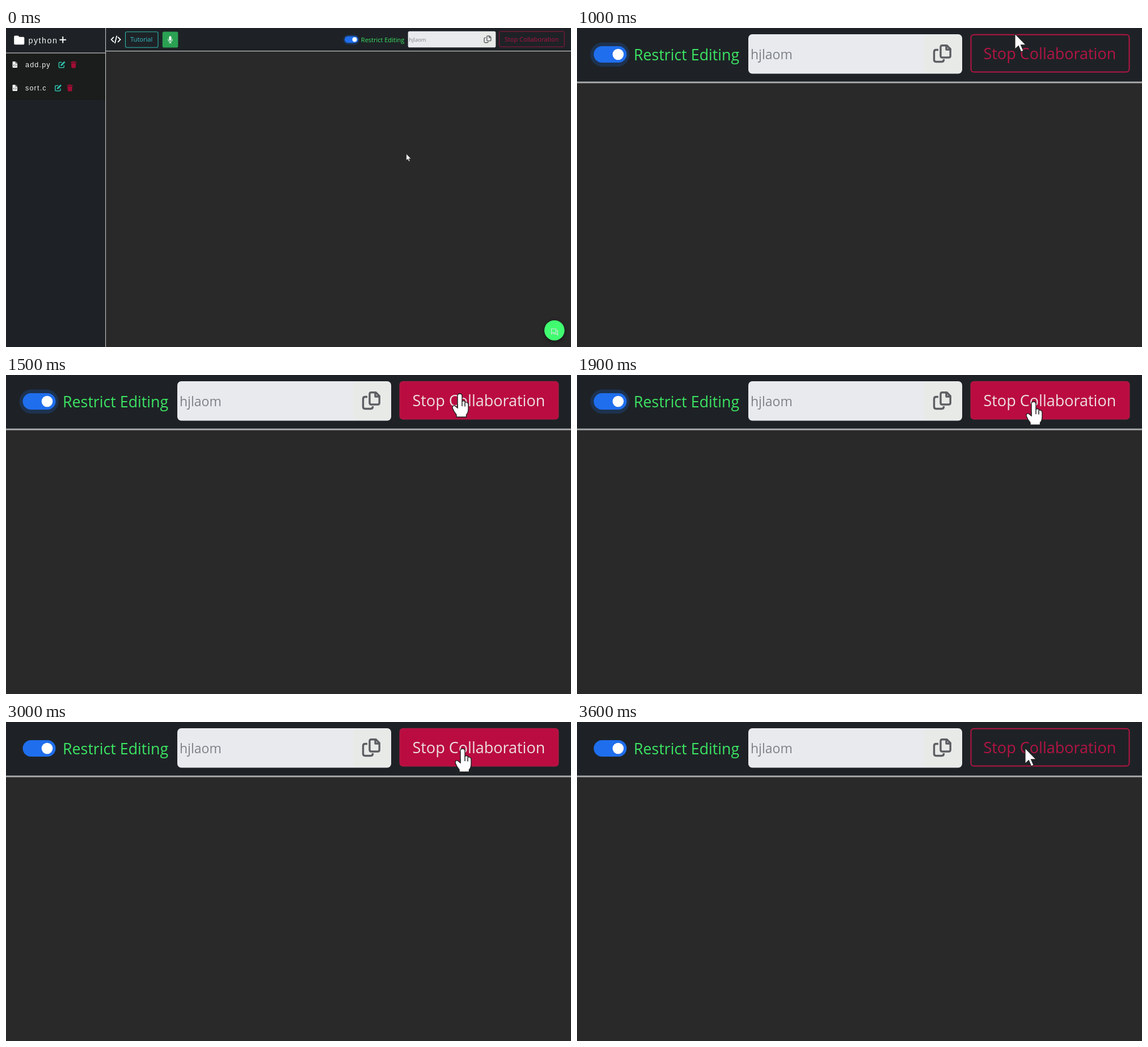
An HTML page with a canvas for the animation above (3750 ms loop, 996 by 562 pixels).

```html
<!DOCTYPE html>
<html lang="en">
<head>
<meta charset="utf-8">
<title>Editor toolbar</title>
<style>
  html, body { margin: 0; width: 100%; height: 100%; overflow: hidden; background: #292929; }
  canvas { display: block; }
</style>
</head>
<body>
<canvas id="stage" width="996" height="562"></canvas>
<script>
const ctx = document.getElementById('stage').getContext('2d');
const LOOP = 3750, STEP = 50;
const ZOOM = 2.438, PIVOT = { x: 991.5, y: 2.2 };
const UI = '"Open Sans", "Noto Sans", sans-serif';
const SANS = '"Liberation Sans", Arial, sans-serif';
const NAV = '#1e2226', LINE = '#c3c5c7', TEAL = '#2fc0ae', RED = '#b31444';

// Pointer path in close-up coordinates: time, x, y
const POINTER = [
  [0, 295, 538], [350, 292, 481], [400, 292, 481], [450, 325, 386],
  [500, 490, 180], [550, 685, 30], [600, 735, 12], [1000, 772, 10],
  [1100, 775, 9], [1150, 779, 12], [1500, 800, 33], [1650, 801, 35],
  [1900, 805, 47], [3050, 805, 47], [3500, 790, 46]
];

const clamp = v => Math.max(0, Math.min(1, v));
const smooth = v => { v = clamp(v); return v * v * (3 - 2 * v); };
const mix = (a, b, k) => a + (b - a) * k;
const mixRgb = (a, b, k) => `rgb(${a.map((v, i) => Math.round(mix(v, b[i], k))).join(',')})`;

function pointerAt(t) {
  const i = POINTER.findIndex(p => p[0] > t);
  if (i < 0) return POINTER[POINTER.length - 1].slice(1);
  const a = POINTER[i - 1], b = POINTER[i], k = (t - a[0]) / (b[0] - a[0]);
  return [mix(a[1], b[1], k), mix(a[2], b[2], k)];
}

function box(x, y, w, h, fill) {
  ctx.fillStyle = fill;
  ctx.fillRect(x, y, w, h);
}

function round(x, y, w, h, r, fill, stroke, width) {
  ctx.beginPath();
  ctx.roundRect(x, y, w, h, r);
  paint(null, fill, stroke, width);
}

function disc(x, y, r, fill) {
  ctx.beginPath();
  ctx.arc(x, y, r, 0, Math.PI * 2);
  ctx.fillStyle = fill;
  ctx.fill();
}

function paint(path, fill, stroke, width = 1) {
  const args = path ? [new Path2D(path)] : [];
  if (fill) { ctx.fillStyle = fill; ctx.fill(...args); }
  if (stroke) { ctx.strokeStyle = stroke; ctx.lineWidth = width; ctx.stroke(...args); }
}

function text(str, x, y, size, family, fill, spacing = 0) {
  ctx.font = `${size}px ${family}`;
  ctx.letterSpacing = spacing + 'px';
  ctx.fillStyle = fill;
  ctx.fillText(str, x, y);
}

function at(x, y, draw) {
  ctx.save();
  ctx.translate(x, y);
  draw();
  ctx.restore();
}

function fileRow(name, y, iconX) {
  at(11.5, y - 5.5, () => {
    paint('M1 0H5.5L8.5 3V10Q8.5 11 7.5 11H1Q0 11 0 10V1Q0 0 1 0Z', '#f4f4f4');
    paint('M5.5 0V3H8.5M3.3 5.2L1.8 6.8L3.3 8.4M5.2 5.2L6.7 6.8L5.2 8.4', null, '#1a1d1b', 0.9);
  });
  text(name, 34, y + 4.5, 12.5, SANS, '#f1f1f1', 1.2);
  at(iconX, y - 6, () => {
    paint('M6 2H2Q.8 2 .8 3.2V10Q.8 11.2 2 11.2H8.6Q9.8 11.2 9.8 10V7', null, TEAL, 1.5);
    paint('M4 6L9.3 .7Q10 0 10.8 .7L11.4 1.3Q12 2 11.3 2.7L6 8L3.6 8.4Z', TEAL);
  });
  at(iconX + 21.5, y - 6, () =>
    paint('M0 1H3L3.7 0H6.5L7.2 1H10.2V2.5H0ZM.8 3.3H9.4L8.8 11Q8.7 12 7.7 12H2.5Q1.5 12 1.4 11Z', '#a10d34'));
}

function sidebar() {
  box(0, 0, 175, 562, NAV);
  box(0, 44, 175, 83, '#1a1d1b');
  paint('M16 13.5H21.5L23.5 15.8H30.5Q32.3 15.8 32.3 17.6V27.5Q32.3 29.3 30.5 29.3H16Q14.2 29.3 14.2 27.5V15.3Q14.2 13.5 16 13.5Z', '#fff');
  text('python', 39.5, 27, 14.3, SANS, '#f5f5f5', 1.5);
  paint('M94.3 20.8H106M100.2 15V26.6', null, '#fff', 1.9);
  fileRow('add.py', 64.5, 92.5);
  fileRow('sort.c', 105.5, 86);
  box(0, 43.4, 175, 1.2, LINE);
  box(175, 0, 1.1, 562, LINE);
}

function leftTools() {
  paint('M190 15.8L185.6 20.3L190 24.8M197.2 15.8L201.6 20.3L197.2 24.8M195.3 13.6L191.9 27', null, '#fff', 1.8);
  round(210.5, 6.8, 57.5, 27.4, 2.5, null, '#2cb4ac', 1.1);
  text('Tutorial', 219, 24.4, 11.1, UI, '#35bfca');
  round(275.8, 6.5, 27.5, 28, 2.5, '#2aa153');
  round(287.4, 14.3, 4.2, 8, 2.1, '#fff');
  paint('M285.6 19.5V20.3Q285.6 24 289.5 24Q293.4 24 293.4 20.3V19.5M289.5 24V26.2M287.3 26.2H291.7', null, '#fff', 1);
}

function chatButton() {
  ctx.save();
  ctx.shadowColor = 'rgba(0,0,0,.5)';
  ctx.shadowBlur = 7;
  ctx.shadowOffsetY = 2;
  disc(966.8, 532.7, 17.8, '#40fb70');
  ctx.restore();
  paint('M961.5 530H969.5V536.5H964L961.5 538.8Z', null, '#d5e5dc', 1.2);
  paint('M971 532.5H972.5V541L970 538.8H965.5V537.5', null, '#d5e5dc', 1.2);
}

// Toolbar controls, in close-up coordinates
function rightTools(hover, focused) {
  if (focused) round(23.5, 25.5, 69, 42.5, 21, '#1d324f');
  round(29.5, 32, 58, 29, 14.5, '#1f6eed');
  disc(72.5, 46.5, 9.8, '#fff');
  text('Restrict Editing', 100, 57, 26.8, UI, '#3ce463');

  round(302, 11, 377, 69.5, 7, '#e8eaee');
  round(612, 12, 66, 67.5, 6, '#e8eae8');
  text('hjlaom', 306, 55, 23, UI, '#7d8186');
  ctx.lineJoin = 'round';
  paint('M644 30.8H652L658.2 37V49Q658.2 52 655.2 52H644Q641 52 641 49V33.8Q641 30.8 644 30.8ZM651 31V38H658', null, '#5c5f62', 3.4);
  paint('M637 38.5H633Q629.5 38.5 629.5 42V56Q629.5 59.5 633 59.5H643Q646.5 59.5 646.5 56V55', null, '#5c5f62', 3.4);
  ctx.lineJoin = 'miter';

  round(694.5, 11.8, 279, 65.7, 5, `rgba(186,12,64,${hover})`, RED, 2);
  text('Stop Collaboration', 716.5, 55, 27, UI, mixRgb([179, 20, 68], [237, 222, 227], hover));
}

function arrow() {
  ctx.scale(1.7, 1.7);
  paint('M0 0V16.2L3.7 12.7L6.3 18.8L8.8 17.7L6.2 11.7H11.4Z', '#fff', '#202020', 0.7);
}

function hand() {
  paint('M-4 4Q-4 0 0 0Q4 0 4 4V13Q9 11.5 9.3 15Q14.5 14 15 19V28Q14.5 34 11.5 37V41H-6V37Q-11 31 -13 25Q-13 20 -9 21L-4 25Z', '#fff', '#202020', 1.4);
  paint('M4 13V22M9 15.5V22.5M-4 18V25', null, '#303030', 1.6);
}

function draw(t) {
  const scale = mix(1, ZOOM, smooth(t / 350));
  const over = t >= 1150 && t < 3250;
  const hover = smooth((t - 1150) / 150) * (1 - smooth((t - 3250) / 150));

  ctx.setTransform(scale, 0, 0, scale, PIVOT.x * (1 - scale), PIVOT.y * (1 - scale));
  box(-10, -10, 1030, 600, '#292929');
  box(175, -10, 840, 50.5, NAV);
  box(175, 40, 840, 1.2, scale > 1.5 ? '#a9abad' : LINE);
  sidebar();
  leftTools();
  chatButton();

  ctx.translate(PIVOT.x * (1 - 1 / ZOOM), PIVOT.y * (1 - 1 / ZOOM));
  ctx.scale(1 / ZOOM, 1 / ZOOM);
  rightTools(hover, t < 3000);
  at(...pointerAt(t), over ? hand : arrow);
}

const start = performance.now();
function tick() {
  const t = (performance.now() - start) % LOOP;
  draw(Math.floor(t / STEP) * STEP);
  requestAnimationFrame(tick);
}
tick();
</script>
</body>
</html>
```
